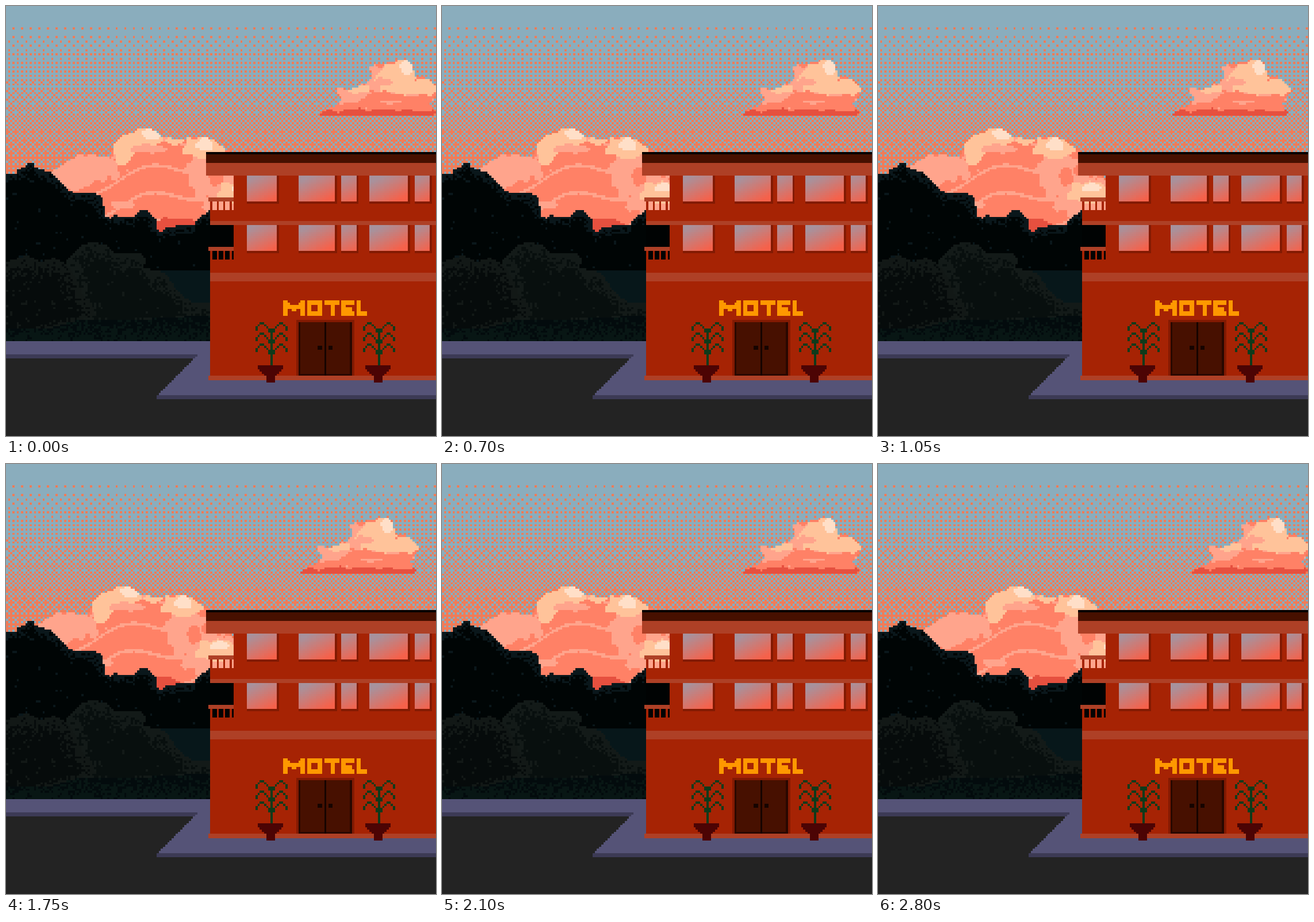
Write an HTML page with a canvas that moves like this. It is 748x748 px and loops after 3150 ms.

```html
<!DOCTYPE html>
<html lang="en">
<head>
<meta charset="utf-8">
<title>Motel at dusk</title>
<style>
html, body { margin: 0; width: 100%; height: 100%; overflow: hidden; background: #232323; }
canvas { display: block; width: 748px; height: 748px; image-rendering: pixelated; }
</style>
</head>
<body>
<canvas id="stage" width="200" height="200" role="img" aria-label="MOTEL"></canvas>
<script>
const ctx = document.getElementById('stage').getContext('2d');
const N = 200, STEP_MS = 350, STEPS = 9;
const SMALL_SHIFT = [0, 4, 6, 9, 12], BIG_SHIFT = [0, 3, 6, 10, 13];

const C = {
  sky: '#8aadbd', dots: '#f07c58',
  main: '#ff8166', light: '#ffa48c', peach: '#ffc39a', white: '#ffdfc8', ember: '#e6503f',
  wall: '#a62304', trim: '#ae4026', shade: '#831a02', brown: '#471000', black: '#160400',
  walk: '#555377', curb: '#3c3a55', road: '#232323',
  leaf: '#0e3a1a', pot: '#4c0404', sign: '#ff9800'
};

function rect(color, x, y, w, h) {
  ctx.fillStyle = color;
  ctx.fillRect(x, y, w, h);
}

const parse = points => points.split(' ').map(p => p.split(',').map(Number));

// Repeatable noise in 0..1 for one cell
function noise(x, y) {
  const n = Math.sin(x * 127.1 + y * 311.7) * 43758.5453;
  return n - Math.floor(n);
}

// Smooth waves that roughen round shapes
const ripple = (x, y) => Math.sin(x * 0.5 + y * 0.8) * 0.2 + Math.sin(x * 0.9 - y * 0.4) * 0.15;

// Hard-edged polygon; paint(x, y, depth) gives the colour of each cell
function poly(points, paint, shift = 0) {
  const p = parse(points), top = [];
  for (let y = 0; y < N; y++) {
    const cy = y + 0.5, hits = [];
    p.forEach(([x1, y1], i) => {
      const [x2, y2] = p[(i + 1) % p.length];
      if ((y1 <= cy) !== (y2 <= cy)) hits.push(x1 + (cy - y1) * (x2 - x1) / (y2 - y1));
    });
    hits.sort((a, b) => a - b);
    for (let i = 0; i + 1 < hits.length; i += 2) {
      const a = Math.round(hits[i]), b = Math.round(hits[i + 1]);
      for (let x = a; x < b; x++) {
        top[x] ??= y;
        rect(paint(x, y, Math.min(y - top[x], x - a, b - 1 - x)), x + shift, y, 1, 1);
      }
    }
  }
}

// Line of square dabs through cell points
function line(color, points, size) {
  const p = parse(points);
  for (let i = 1; i < p.length; i++) {
    const [x1, y1] = p[i - 1], [x2, y2] = p[i];
    const n = Math.max(Math.abs(x2 - x1), Math.abs(y2 - y1));
    for (let k = 0; k <= n; k++) {
      rect(color, Math.round(x1 + (x2 - x1) * k / n), Math.round(y1 + (y2 - y1) * k / n), size, size);
    }
  }
}

// Ordered dither that thickens steadily downwards
function sky() {
  const bayer2 = [[0, 2], [3, 1]];
  rect(C.sky, 0, 0, N, N);
  for (let y = 10; y < 110; y++) {
    const level = Math.floor(1 + (y - 10) / 5.7);
    for (let x = 0; x < N; x++) {
      const u = (x + 1) % 4, v = (y + 2) % 4;
      if (4 * bayer2[v % 2][u % 2] + bayer2[v >> 1][u >> 1] < level) rect(C.dots, x, y, 1, 1);
    }
  }
}

// Outline filled with streaks and rough ellipses of [tone, x, y, rx, ry]
function cloud(outline, patches, shift) {
  poly(outline, (x, y) => {
    const edge = 1 + ripple(x, y);
    const streak = Math.sin(x * 0.1 + y * 0.5 + 2 * Math.sin(x * 0.12)) > 0.93;
    let color = streak ? C.light : C.main;
    for (const [tone, cx, cy, rx, ry] of patches) {
      if (((x - cx) / rx) ** 2 + ((y - cy) / ry) ** 2 < edge) color = C[tone];
    }
    return color;
  }, shift);
}

function smallCloud(shift) {
  cloud('137,51 139,48 145,46 147,43 145,40 145,38 150,39 154,38 157,36 160,35 161,33 160,28 164,27 ' +
    '171,26 173,25 177,25 180,27 181,33 185,33 189,35 192,39 190,43 188,45 189,48 191,49 190,51', [
    ['light', 152, 41, 9, 5], ['light', 165, 34, 7, 7], ['peach', 173, 33, 10, 8],
    ['peach', 184, 37, 8, 4], ['peach', 154, 38, 6, 2], ['white', 177, 28, 3, 3.5],
    ['light', 166, 35, 4, 2], ['main', 166, 44, 12, 4.5], ['main', 184, 44, 5, 3],
    ['main', 153, 46, 6, 2], ['light', 169, 44, 5, 1], ['ember', 165, 52, 40, 4.5]
  ], 9 - shift);
}

function bigCloud(shift) {
  cloud('18,79 23,76 29,72 34,69 38,69 46,70 49,69 50,65 54,60 59,59 62,57 67,57 71,59 72,61 81,62 ' +
    '86,61 91,61 96,62 98,64 103,67 108,72 109,78 113,79 118,84 118,108 30,108', [
    ['light', 36, 75, 18, 7], ['light', 31, 81, 9, 4], ['peach', 54, 66, 5, 8],
    ['peach', 64, 61, 9, 5], ['light', 65, 66, 8, 2], ['white', 67, 59, 4, 2.5],
    ['peach', 78, 62, 5, 2], ['light', 93, 76, 9, 14], ['light', 106, 89, 15, 10],
    ['main', 97, 79, 3, 4], ['peach', 92, 65, 11, 5], ['white', 92, 64, 4, 3],
    ['peach', 107, 86, 10, 5], ['white', 109, 84, 5, 2],
    ['light', 54, 92, 6, 1.5], ['ember', 79, 102, 11, 4]
  ], -shift);
}

// Foliage: speckled near its edge and in loose drifts inside
const foliage = (base, rim, reach, drift) => (x, y, depth) =>
  noise(x, y) < Math.max(1 - depth / reach, ripple(x, y) * drift) ? rim : base;

function trees() {
  poly('-9,79 5,78 5,76 9,75 10,73 13,73 13,75 16,76 20,77 22,79 26,82 28,85 32,87 41,87 45,89 46,98 ' +
    '49,99 50,97 53,98 59,98 61,97 62,95 66,95 68,98 70,100 70,104 72,106 74,103 84,102 88,102 88,100 ' +
    '92,97 94,95 106,95 106,156 -9,156', foliage('#000505', '#0a171b', 5, 0.25));
  rect('#07171a', 70, 123, 25, 33);
  for (let y = 143; y < 156; y++) {
    for (let x = 0; x < 95; x++) rect(noise(x, y) < (y - 143) / 14 ? '#081614' : '#030b0d', x, y, 1, 1);
  }
  poly('28,119 31,115 34,112 39,110 46,111 51,115 63,115 65,118 64,122 74,124 78,130 82,135 87,138 ' +
    '106,138 106,143 60,146 35,146', foliage('#080f0e', '#131a18', 10, 0.6));
  poly('-9,119 0,119 6,117 10,116 16,119 22,117 28,120 33,127 36,135 40,139 42,144 30,147 20,150 -9,150',
    foliage('#060b0b', '#121816', 10, 0.6));
}

function ground() {
  rect(C.road, 0, 164, N, 36);
  rect(C.walk, 0, 156, N, 6);
  rect(C.curb, 0, 162, N / 2, 2);
  for (let y = 162; y < 181; y++) rect(C.walk, 251 - y, y, N, 1);
  rect(C.curb, 70, 181, N, 2);
}

function windowPane(x, y, w) {
  rect(C.shade, x, y, w + 1, 13);
  const mid = x + w / 2;
  const g = ctx.createLinearGradient(mid - 3, y, mid + 3, y + 12);
  g.addColorStop(0, '#a7929d');
  g.addColorStop(1, '#f6614a');
  rect(g, x, y, w, 12);
}

function balcony(y) {
  rect(C.trim, 94, y, 12, 2);
  for (let x = 95; x < 106; x += 3) rect(C.wall, x, y + 2, 1, 4);
}

function sign() {
  const strokes = [
    '129,142 129,137 133,140 137,137 137,142',
    '140,137 145,137 145,142 140,142 140,137',
    '148,137 153,137', '151,137 151,142',
    '160,137 156,137 156,142 160,142', '156,140 159,140',
    '163,137 163,142 166,142'
  ];
  for (const s of strokes) line(C.sign, s, 2);
}

function door() {
  rect(C.shade, 135, 146, 27, 26);
  rect('#290800', 136, 147, 25, 25);
  rect(C.brown, 137, 147, 23, 24);
  rect(C.black, 148, 147, 1, 25);
  for (const x of [145, 150]) rect(C.black, x, 158, 2, 2);
}

// Three tiers of drooping fronds on a stem, in a tapering pot
function plant(x) {
  rect(C.leaf, x, 150, 1, 17);
  for (let tier = 0; tier < 3; tier++) {
    for (const side of [-1, 1]) {
      for (let k = 0; k < 8; k++) {
        const y = 147 + 5 * tier + 0.28 * (k - 4.5) ** 2;
        rect(C.leaf, x + side * k, Math.round(y), 1, k % 7 < 2 ? 2 : 1);
      }
    }
  }
  rect(C.pot, x - 6, 167, 12, 2);
  for (let i = 0; i < 4; i++) rect(C.pot, x - 5 + i, 169 + i, 10 - 2 * i, 1);
  rect(C.pot, x - 2, 173, 4, 2);
}

function building() {
  rect(C.wall, 106, 79, 94, 93);
  rect(C.wall, 95, 95, 105, 7);
  rect(C.wall, 95, 118, 105, 54);
  rect('#050000', 93, 68, 107, 1);
  rect(C.brown, 93, 69, 107, 4);
  rect(C.trim, 93, 73, 107, 6);
  rect(C.trim, 95, 100, 105, 2);
  rect(C.trim, 95, 124, 105, 4);
  rect(C.trim, 94, 172, 106, 2);
  // Dark hollow behind the lower balcony
  rect('#000303', 95, 102, 11, 16);
  for (const floor of [0, 23]) {
    balcony(89 + floor);
    for (const [x, w] of [[112, 14], [136, 17], [156, 7], [169, 18], [190, 7]]) windowPane(x, 79 + floor, w);
  }
  sign();
  door();
  plant(123);
  plant(173);
}

function draw(step) {
  sky();
  smallCloud(SMALL_SHIFT[step]);
  bigCloud(BIG_SHIFT[step]);
  trees();
  ground();
  building();
}

// The clouds drift left for four steps, then back
let shown = -1;
function tick() {
  const beat = Math.floor(performance.now() / STEP_MS) % STEPS;
  const step = Math.min(beat, STEPS - 1 - beat);
  if (step !== shown) draw(shown = step);
  requestAnimationFrame(tick);
}
tick();
</script>
</body>
</html>
```
